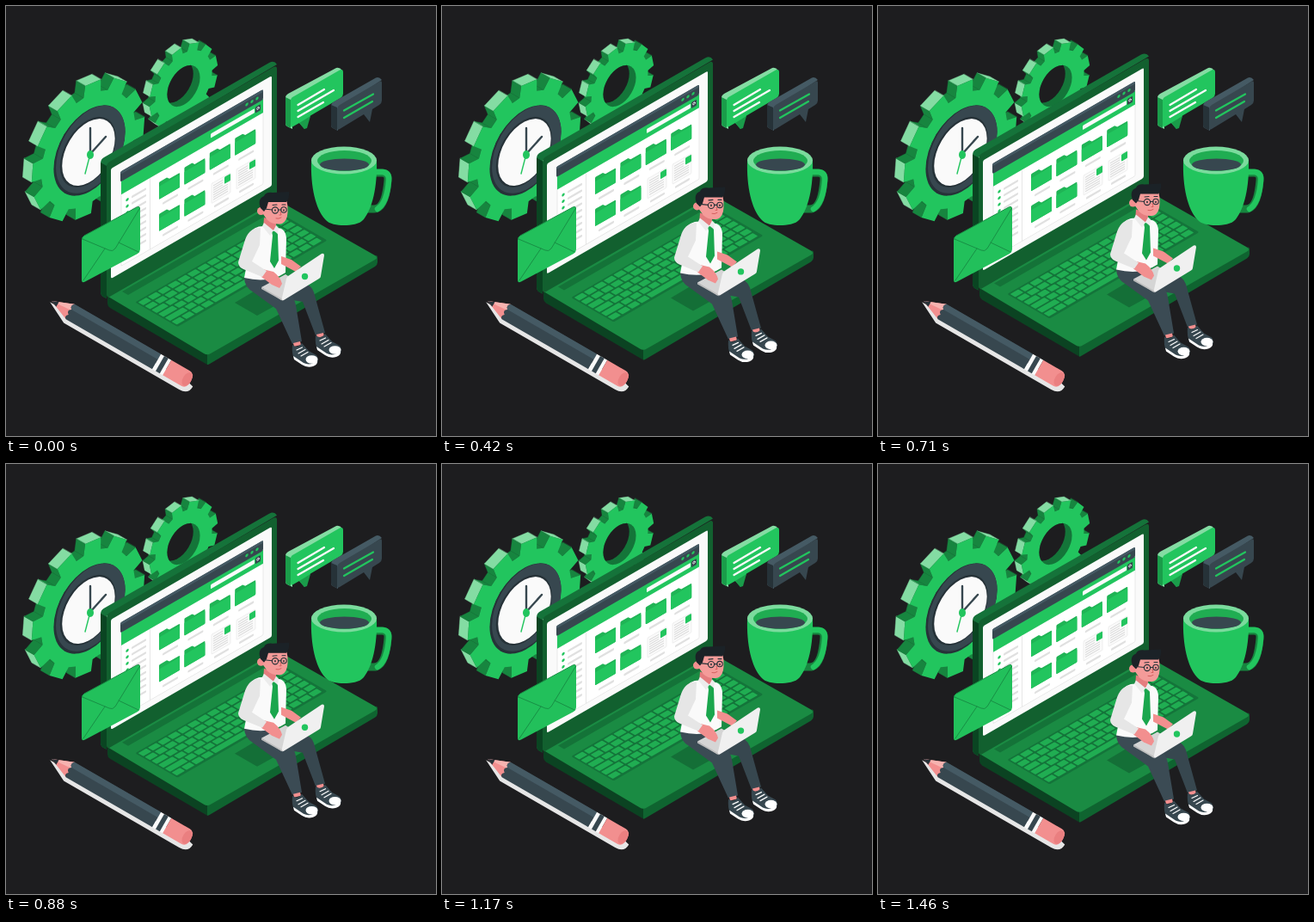
An HTML page that plays this animation: 500x500 px, repeating every 1500 ms.

```html
<!DOCTYPE html>
<html lang="en">
<head>
<meta charset="utf-8">
<title>Office desk</title>
<style>
  html, body { margin: 0; height: 100%; overflow: hidden; background: #1d1d1f; }
  svg { display: block; width: 100vw; height: 100vh; }
</style>
</head>
<body>
<svg viewBox="0 0 500 500" fill="none" stroke-linejoin="round" stroke-linecap="round">
  <g id="gears"></g>

  <!-- clock -->
  <g transform="matrix(.866 -.45 0 1 97 168)">
    <circle r="48" fill="#263238"/>
    <circle cx="1.5" cy="-.5" r="46.5" fill="#37474f"/>
    <circle cx="-2" cy="1" r="37.500" fill="#263238"/>
    <circle cx="-1.200" cy="1.500" r="35.500" fill="#fafafa"/>
  </g>
  <path d="M98 172V142M98 172L116 152" stroke="#37474f" stroke-width="2.4"/>
  <path d="M98 172L92 195" stroke="#22c55e" stroke-width="1.4"/>
  <ellipse cx="98" cy="173" rx="4" ry="5" fill="#22c55e"/>

  <!-- speech bubbles -->
  <path d="M325 106Q325 104 328 102L384 72Q388 71 391 75L333 109V143L327 140Q325 139 325 136Z" fill="#84dca3"/>
  <path d="M325 106L331 109V142L327 140Q325 139 325 136Z" fill="#1a9c4a"/>
  <path d="M331 110Q331 107 334 105.500L388 74.500Q392 73 392 77V102Q392 105 389 107L354 127.500L347 143L341 136L334 140Q331 142 331 138Z" fill="#22c55e"/>
  <path d="M341 136L347 143L350 142L354 128Z" fill="#1a9c4a"/>
  <path d="M339.500 115L370 97M339.500 122L381 98M339.500 129L369 112" stroke="#fafafa" stroke-width="2.300"/>
  <path d="M378 116Q378 114 380 112L430 83.500Q434 82 437 86L386 120V145L380 142Q378 141 378 138Z" fill="#455a64"/>
  <path d="M378 115L385 118V144.500L380 142Q378 141 378 138Z" fill="#263238"/>
  <path d="M385 120Q385 117 388 115L434 88Q437 86 437 89V110Q437 113 434 115L426 120L423 135L416 126L388 143Q385 145 385 142Z" fill="#37474f"/>
  <path d="M393 121.500L427 102.500M393 130L426 111" stroke="#22c55e" stroke-width="2.200"/>

  <!-- pencil -->
  <g transform="translate(53 343) rotate(30)">
    <path d="M-1 2L25 15H180Q192 15 192 4L184 2Z" fill="#e6e6e6"/>
    <path d="M0 0L25-10V10Z" fill="#f28f8f"/>
    <path d="M0 0L25-10L25-2Z" fill="#f7b3b0"/>
    <path d="M0 0L8-3.200V3.200Z" fill="#263238"/>
    <path d="M25-10Q21-6 25-3Q20 0 25 4Q21 8 25 10H141V-10Z" fill="#37474f"/>
    <path d="M25-10Q21-6 25-3H141V-10Z" fill="#455a64"/>
    <path d="M141-10H155V10H141Z" fill="#fafafa"/>
    <path d="M145.500-10H151V10H145.500Z" fill="#37474f"/>
    <path d="M155-10H180Q187-10 187 0T180 10H155Z" fill="#f28f8f"/>
    <ellipse cx="182" rx="5" ry="8.500" fill="#ea7f80"/>
  </g>

  <g class="float">
    <!-- base -->
    <path d="M118 335L234 404V417L121 351Q118 349 118 346Z" fill="#0b4322"/>
    <path d="M234 404L430 290Q432 290 432 293V298Q432 301 429 303L237 416Q235 417.500 234 417Z" fill="#0f6430"/>
    <path d="M119 338Q117 336 119 333L313 224L429 290Q433 293 429 295L238 404Q234 406.500 230 404Z" fill="#1a8b43"/>
    <path d="M135 332L142 336L314 237L307 233Z" fill="#147338"/>
    <path d="M266 345L292 360L330 339L303 323Z" fill="#146f37"/>
    <g id="keys" transform="matrix(.866 -.5 .866 .5 151 345)"></g>

    <!-- lid -->
    <path d="M110 183Q110 178 114 176L306 66Q312 63 315 68L117 185V340L113 338Q110 336 110 332Z" fill="#15733a"/>
    <path d="M110 182L117 186V340L113 338Q110 336 110 332Z" fill="#0a4522"/>
    <g id="screen" transform="matrix(1 -.577 0 1 0 67.500)"></g>
  </g>

  <!-- mug -->
  <path d="M428 194H437Q445 194 444 203Q441 236 428 236H420" stroke="#17853f" stroke-width="9" stroke-linecap="butt"/>
  <path d="M429 193H438Q446 194 445 203Q443 229 432 236" stroke="#22c55e" stroke-width="6.500"/>
  <path d="M355 180C354 210 360 236 371 248C376 254 385 255 393 255S411 254 416 248C426 236 432 210 431 180Z" fill="#22c55e"/>
  <ellipse cx="393" cy="179.500" rx="38" ry="16" fill="#7bdb9d"/>
  <ellipse cx="393.500" cy="180" rx="31.500" ry="12" fill="#20ad52"/>
  <ellipse cx="393.500" cy="184.500" rx="28.500" ry="7" fill="#37474f"/>

  <!-- envelope -->
  <path d="M88 272Q88 269 91 267L152 234Q156 232 156 237V283Q156 286 153 288L92 320.500Q88 323 88 318Z" fill="#22c05b"/>
  <path d="M88.500 271Q88 269 91 267L152 234Q156 232 155.500 236" stroke="#188f45" stroke-width="1"/>
  <path d="M89 271L120 284Q124 286 127 282L155 236M90 319L115 282M154 286L131 275" stroke="#188f45" stroke-width="1"/>

  <!-- man -->
  <g class="float">
    <path d="M326 321L345 322Q355 324 358 333L371 380L360 383L345 344L322 340Z" fill="#37474f"/>
    <path d="M277 315L310 316L328 330Q335 338 337 348L344 390L333 393L314 352L288 333Q277 327 277 315Z" fill="#3b4b54"/>
    <path d="M361 382L369 380L370 384L362 386ZM334 392L342 390L343 394L335 396Z" fill="#f28f8f"/>
    <g id="shoe">
      <path d="M333 394Q339 399 344 392L352 401L361 406Q364 410 362 415Q354 421 346 418L335 410Q332 404 333 394Z" fill="#37474f"/>
      <path d="M334 407L346 415Q354 419 362 412Q363 417 357 419Q350 421 344 417L335 411Z" fill="#fff"/>
      <ellipse cx="355.500" cy="411" rx="7" ry="4.800" fill="#fff"/>
      <path d="M338 400L344.500 397M340 404L348 399.500M343 407L351 402.500" stroke="#fff" stroke-width="1.200"/>
    </g>
    <use href="#shoe" x="27" y="-11"/>

    <path d="M300 246L314 251V266L299 259Z" fill="#e57d7f"/>
    <path d="M299 256L307 263L315 258Q325 258 326 270L325 310Q306 323 277 316L282 290L283 265Q288 256 299 256Z" fill="#fafafa"/>
    <path d="M309 262L315 261L316 266L317 296L312 305L307 297L310 267Z" fill="#1aa64d"/>
    <path d="M298 256L300 252L311 261L307 267ZM314 255L317 258L316 265L311 261Z" fill="#ececec"/>
    <path d="M320 291L332 295L343 303L337 309L320 300Z" fill="#f28f8f"/>
    <path d="M297 327L325 312L345 325L320 342Z" fill="#d5d5d5"/>
    <path d="M294 305L311 309Q319 315 321 323L318 328L309 324L297 315Z" fill="#f28f8f"/>
    <path d="M296 258Q282 257 277 275L270 298Q270 303 276 306L298 315L303 308L286 297L295 278Z" fill="#e6e6e6"/>
    <path d="M328 314L367 288Q370 287 370 290L366 314Q366 316 364 317L323 342Q320 343 321 339L326 317Q327 315 328 314Z" fill="#f0f0f0"/>
    <path d="M297 327L320 340L322 343L297 329Z" fill="#bdbdbd"/>
    <circle cx="347.500" cy="314.500" r="3.700" fill="#22c55e"/>

    <circle cx="296.500" cy="238.500" r="4.500" fill="#f28f8f"/>
    <path d="M299 225L326 224Q328 232 327.500 240Q327 250 321 253Q311 255 304 249L299 242Z" fill="#f49b99"/>
    <path d="M296 235Q292 224 300 221Q302 216 310 217L329 216Q330 223 326 228L305 228L303 235L300 239Z" fill="#1b2227"/>
    <g stroke="#263238" stroke-width="1.100">
      <circle cx="313" cy="237.500" r="3.600"/>
      <circle cx="323" cy="237" r="3.200"/>
      <path d="M300 236L309.500 237M316.500 237H320M310 231.500L315 231M321 231H325"/>
    </g>
    <path d="M313 237V238M323 237V238" stroke="#263238" stroke-width="1.600"/>
    <path d="M319 239L320 243H318M314 247Q317 248 320 246" stroke="#d4605f" stroke-width="1"/>
  </g>
</svg>

<script>
  const byId = id => document.getElementById(id);
  const points = list => list.map(p => p.map(n => n.toFixed(1)).join()).join(' ');
  const rect = (x, y, w, h, fill, r = 0, more = '') =>
    `<rect x="${x}" y="${y}" width="${w}" height="${h}" rx="${r}" fill="${fill}" ${more}/>`;
  const times = (n, draw) => Array.from({ length: n }, (_, i) => draw(i)).join('');

  // Toothed wheel on the left wall plane, extruded up and to the left.
  function gear(cx, cy, radius, turn, depth, hole) {
    const at = (deg, r) => {
      const a = deg * Math.PI / 180, u = r * Math.cos(a);
      return [cx + .866 * u, cy - r * Math.sin(a) - .45 * u];
    };
    const [dx, dy] = [-.866 * depth, -.5 * depth];
    const tooth = [[-10.5, .83], [-8, 1], [8, 1], [10.5, .83]];
    const rim = [];
    for (let i = 0; i < 12; i++)
      for (const [deg, k] of tooth) rim.push(at(i * 30 + turn + deg, radius * k));

    // Only edges facing the extrusion are visible, nearest drawn first.
    const walls = rim.map((p, i) => {
      const q = rim[(i + 1) % rim.length];
      return {
        p, q, tip: i % 4 === 1,
        facing: (p[1] - q[1]) * dx + (q[0] - p[0]) * dy,
        far: (p[0] + q[0]) * dx + (p[1] + q[1]) * dy
      };
    }).filter(w => w.facing > 0).sort((a, b) => a.far - b.far).map(({ p, q, tip }) => {
      const quad = [p, q, [q[0] + dx, q[1] + dy], [p[0] + dx, p[1] + dy]];
      const fill = tip ? '#84dca3' : '#17853f';
      return `<polygon points="${points(quad)}" fill="${fill}" stroke="${fill}" stroke-width=".4"/>`;
    }).join('');

    const ring = (x, y, fill) =>
      `<circle r="${hole}" transform="matrix(.866 -.45 0 1 ${x} ${y})" fill="${fill}"/>`;
    const id = 'hole' + hole;
    const bore = `<clipPath id="${id}">${ring(cx, cy, '#000')}</clipPath>` + ring(cx, cy, '#147539') +
      `<g clip-path="url(#${id})">${ring(cx + dx, cy + dy, '#1d1d1f')}</g>`;
    return walls + `<polygon points="${points(rim)}" fill="#22c55e"/>` + bore;
  }
  byId('gears').innerHTML = gear(95.5, 167, 76, -5, 12, 45) + gear(206.5, 93, 46, 12, 9, 22);

  // Keyboard: x runs along a row, y towards the user.
  const keyFill = '#20ad52';
  const row = r => {
    const y = 1 + r * 9;
    if (r === 5) {
      return times(4, i => rect(2 + i * 13, y, 11, 7, keyFill, 1)) +
        rect(54, y, 63, 7, keyFill, 1) + times(6, i => rect(119 + i * 13.3, y, 11.3, 7, keyFill, 1));
    }
    const first = [11, 11, 16, 19, 24][r];
    const n = 14, step = (196 - first) / n;
    return rect(2, y, first, 7, keyFill, 1) +
      times(n, i => rect(4 + first + i * step, y, step - 2, 7, keyFill, 1));
  };
  byId('keys').innerHTML = rect(0, -1, 201, 57, '#14743a', 2) + times(6, row);

  // Screen: x is the stage x, y is measured along the left edge.
  const gray = '#e0e0e0';
  const label = (x, y, w) => rect(x, y, w, 2.6, gray, 1);
  const folder = (x, y) =>
    `<path d="M${x} ${y + 1}q0-1 1-1h8l3 3h11q1 0 1 1v15q0 1-1 1h-22q-1 0-1-1z" fill="#1fb455"/>` +
    rect(x, y + 5, 24, 15, '#22c55e', 1) + label(x + 4, y + 26, 18);
  const sheet = (x, y) =>
    rect(x, y, 22, 23, '#fafafa', 1, 'stroke="#ebebeb" stroke-width=".7"') +
    times(7, i => rect(x + 2, y + 3 + i * 2.7, i < 3 ? 11 : 17, 1, '#d6d6d6')) +
    rect(x + 15, y + 1, 7, 8, '#22c55e', 1) + label(x + 3, y + 27, 17);

  byId('screen').innerHTML =
    rect(117, 183, 198, 157, '#12602f', 4) +
    rect(122, 192, 187, 128, '#fafafa', 2) +
    rect(134, 204, 165, 108, '#fff', 1, 'stroke="#e4e4e4" stroke-width=".8"') +
    rect(134, 213, 165, 16, '#22c55e') +
    rect(133, 202, 166, 12, '#37474f', 2) +
    rect(133, 202, 166, 3, '#455a64', 1.5) +
    times(3, i => `<circle cx="${280 + i * 6}" cy="208.500" r="1.700" fill="#22c55e"/>`) +
    rect(238, 218.5, 51, 5, '#fafafa', 1) +
    rect(290, 217.5, 6, 7, '#37474f', 1) +
    '<circle cx="293" cy="220.500" r="1.300" stroke="#fafafa" stroke-width=".7"/>' +
    rect(167, 229, .8, 83, gray) +
    times(9, i => `<circle cx="141" cy="${239 + i * 7.5}" r="1.700" fill="#22c55e"/>` +
      label(146, 237.7 + i * 7.5, 17)) +
    times(4, i => folder(178 + i * 29.4, 240)) +
    times(2, i => folder(178 + i * 29.4, 277)) +
    sheet(239, 277) + sheet(268, 277);

  const floating = document.querySelectorAll('.float');
  const loop = 1500, lift = 10;
  function frame() {
    const phase = performance.now() % loop / loop;
    const rise = lift * (1 - Math.abs(1 - 2 * phase));
    for (const part of floating) part.setAttribute('transform', `translate(0 ${-rise})`);
    requestAnimationFrame(frame);
  }
  frame();
</script>
</body>
</html>
```
